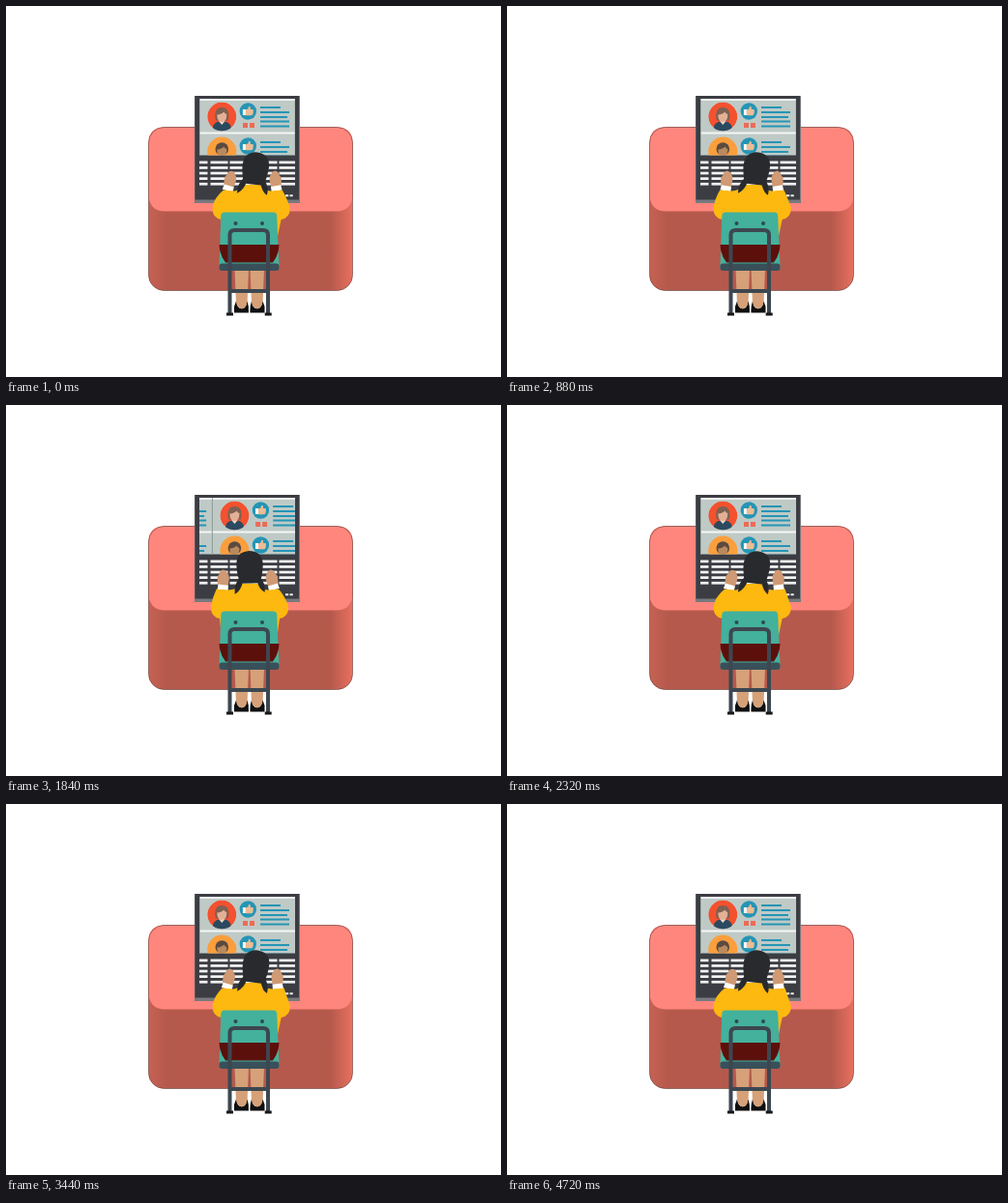
Write an HTML page that moves like this. It is 512 px wide and 384 px high and loops after 4800 ms.

```html
<!DOCTYPE html>
<html lang="en">
<head>
<meta charset="utf-8">
<title>Student at a laptop</title>
<style>
html, body { margin: 0; width: 100%; height: 100%; overflow: hidden; background: #fff; }
svg { display: block; width: 100vw; height: 100vh; }
</style>
</head>
<body>
<svg viewBox="0 0 512 384" xmlns="http://www.w3.org/2000/svg">
  <defs>
    <linearGradient id="front">
      <stop offset="0" stop-color="#c66254"/>
      <stop offset=".09" stop-color="#b5594c"/>
      <stop offset=".89" stop-color="#b5594c"/>
      <stop offset="1" stop-color="#e8705f"/>
    </linearGradient>
    <clipPath id="screen"><rect x="200" y="96" width="99" height="58.5"/></clipPath>
    <clipPath id="disc"><circle r="15"/></clipPath>

    <g id="thumb">
      <circle r="8.7" fill="#2595b5"/>
      <rect x="-5.4" y="-2" width="3" height="6" fill="#fff"/>
      <path d="M-2.4 -1.6L.2 -2.8L.8 -5.2Q3 -5.4 2.5 -2H5Q6 -1.2 5 3Q4.6 4.2 3 4.2H-2.4Z" fill="#ecbc94"/>
    </g>
    <g id="lines" fill="#2595b5">
      <rect x="63" y="7" width="21" height="2"/>
      <rect x="63" y="12" width="30" height="2"/>
      <rect x="63" y="17" width="28" height="2"/>
      <rect x="63" y="21.500" width="30" height="2"/>
      <rect x="63" y="26.500" width="30" height="2"/>
    </g>
    <g id="page">
      <rect y="96" width="99.500" height="59" fill="#bfcac6"/>
      <path d="M0 97H99.500M0 131.500H99.500" stroke="#f4f6f5" stroke-width="2"/>
      <g transform="translate(23.3 114.5)" clip-path="url(#disc)">
        <circle r="15" fill="#f4512f"/>
        <path d="M-6.500 4Q-9 -9.500 0 -9.500T6.500 4Z" fill="#7d6152"/>
        <path d="M-9.500 15Q-10 6 -3 5H3Q10 6 9.500 15Z" fill="#2b4a60"/>
        <path d="M-3 5L0 8.500L3 5L2 2H-2Z" fill="#f0d8c8"/>
        <path d="M-5 -2Q0 -2.500 2 -5Q3 -3 5 -2.500Q5 5.500 0 5.500T-5 -2Z" fill="#e3b096"/>
      </g>
      <use href="#thumb" x="50.300" y="109"/>
      <path d="M45 121h5v5h-5zM52 121h5v5h-5z" fill="#ee6a55"/>
      <use href="#lines" y="97"/>
      <g transform="translate(23.3 150.5)">
        <circle r="15" fill="#fb9e3c"/>
        <circle cy="-2.500" r="6.800" fill="#5b4a40"/>
        <path d="M-5 -2Q0 -2.500 2 -5Q3 -3 5 -2.500Q5 5.500 0 5.500T-5 -2Z" fill="#b98a5e"/>
      </g>
      <use href="#thumb" x="50.300" y="145"/>
      <use href="#lines" y="133"/>
      <path d="M.2 96V155" stroke="#8d9b99" stroke-width="1"/>
    </g>
    <g id="hand">
      <path d="M-5.800 6L-6.200 -1Q-5.500 -3 -4.300 -4Q-4.200 -7.500 -2 -8Q-.3 -9.700 1.300 -8.400Q3.600 -8.500 4 -6Q6.200 -4 6.200 0L5 7.500H-4.500Z" fill="#cf9a74"/>
      <path d="M-5.200 6L5.200 7.200L4.800 12.500L-6.200 11.500Z" fill="#fff"/>
    </g>
  </defs>

  <!-- desk -->
  <rect x="147.500" y="125.500" width="211" height="169" rx="16" fill="url(#front)"/>
  <path d="M147.500 198V141.500Q147.500 125.500 163.500 125.500H342.500Q358.500 125.500 358.500 141.500V198Q356 212.500 342 212.500H164Q150 212.500 147.500 198Z" fill="#ff867d"/>
  <rect x="147.500" y="125.500" width="211" height="169" rx="16" fill="none" stroke="#5a3531" stroke-opacity=".55"/>

  <!-- laptop -->
  <rect x="195" y="93" width="109" height="111" fill="#77797e"/>
  <rect x="195.500" y="93" width="107.500" height="107.500" fill="#3b3d43"/>
  <g clip-path="url(#screen)"><g id="feed">
    <use href="#page" x="200"/><use href="#page" x="299"/>
  </g></g>
  <g id="keys" fill="#f4f4f4"></g>
  <path d="M289 195.300h3.200v2h-3.200zM293.500 195.300h3.200v2h-3.200z" fill="#f4f4f4"/>

  <!-- student -->
  <g id="left"><use href="#hand"/></g>
  <g id="right"><use href="#hand" transform="scale(-1 1)"/></g>
  <path id="torso" fill="#fdb90f"/>
  <g id="head" fill="#282a2d">
    <path d="M253 151Q266.500 151.500 266.700 165Q266.500 176 263 184.500H243Q239.500 176 239.300 165Q239.500 151.500 253 151Z"/>
    <path d="M242 179Q236 186 237 195.500Q243.500 192 245.500 183Z"/>
    <path d="M264 179Q269.500 186 268 194Q262.500 191.500 260.500 183Z"/>
  </g>
  <path d="M236.500 272H251L249.500 309H238ZM252.500 272H267L265.500 309H254Z" fill="#d6a178"/>
  <path id="shoe" d="M238 305.500Q239 313 243.700 313.300T249.500 305.500Q251.500 311 251 317.500H236V311Z" fill="#101011"/>
  <use href="#shoe" transform="translate(503.500 0) scale(-1 1)"/>
  <path d="M238 305Q239 313 243.700 313.300T249.500 305ZM254 305Q255 313 259.800 313.300T265.500 305Z" fill="#d6a178"/>

  <!-- chair -->
  <path d="M226 213.500H276.500Q280 213.500 280.200 217L282.500 270Q282.500 274 279 274H224Q220.500 274 220.500 270L222.300 217Q222.500 213.500 226 213.500Z" fill="#43b19c"/>
  <path d="M220.500 247H282.500Q282 258 276 265.500H227Q221 258 220.500 247Z" fill="#5c100c"/>
  <rect x="220.500" y="266.500" width="62" height="7.500" rx="3" fill="#39505a"/>
  <path d="M231.500 319V237Q231.500 232 236.500 232H266Q271 232 271 237V319M231.500 295H271" fill="none" stroke="#3d4750" stroke-width="4"/>
  <path d="M228 317.500h7v3h-7zM267.700 317.500h7v3h-7z" fill="#15181b"/>
  <circle cx="237.500" cy="225" r="2" fill="#2d4a50"/>
  <circle cx="265" cy="225" r="2" fill="#2d4a50"/>
</svg>
<script>
const LOOP = 4800, STEP = 80, SWAY = 1200;
const $ = id => document.getElementById(id);

// keyboard: five rows, each with the same [x, width] runs
const runs = [[200, 8.5], [211.5, 18], [231.5, 49], [282.5, 16.5]];
let keys = "";
for (let row = 0; row < 5; row++)
  for (const [x, w] of runs)
    keys += `<rect x="${x}" y="${160.5 + row * 5.6}" width="${w}" height="2.7"/>`;
$("keys").innerHTML = keys;

// smooth periodic curve through [phase, value] pairs
function cycle(points, p) {
  const n = points.length;
  const at = i => {
    const k = (i % n + n) % n;
    return [points[k][0] + Math.floor(i / n), points[k][1]];
  };
  let i = n - 1;
  while (i > 0 && points[i][0] > p) i--;
  const [t0, a] = at(i), [t1, b] = at(i + 1);
  const slope = j => (at(j + 1)[1] - at(j - 1)[1]) / (at(j + 1)[0] - at(j - 1)[0]);
  const d = t1 - t0, u = (p - t0) / d, v = 1 - u;
  return a * v * v * (1 + 2 * u) + b * u * u * (3 - 2 * u)
    + d * u * v * (slope(i) * v - slope(i + 1) * u);
}

const headPath = [[0, 258.3], [.267, 252], [.4, 248], [.533, 252], [.733, 258.3], [.933, 258.4]];
const leftPath = [[0, 232], [.267, 224.7], [.4, 225.7], [.533, 224.7], [.733, 227.3], [.933, 232.2]];
const rightPath = [[0, 278.7], [.267, 274.6], [.4, 274.6], [.533, 274.9], [.733, 279.5], [.933, 280.6]];

function place(id, x, y, turn) {
  $(id).setAttribute("transform", `translate(${x} ${y}) rotate(${turn})`);
}

function draw(t) {
  const p = t % SWAY / SWAY;
  const head = cycle(headPath, p), lx = cycle(leftPath, p), rx = cycle(rightPath, p);
  const lean = head - 253, c = 252.3 + lean * .25;

  $("head").setAttribute("transform", `rotate(${lean * 1.25} 253 211)`);
  place("left", lx, 179.5, (lx - 225) * 1.5);
  place("right", rx, 179.5, (rx - 281) * 1.5);
  $("torso").setAttribute("d",
    `M${lx - 7} 190.5L${lx + 4} 191.5Q${c - 14} 192 ${c - 9} 185H${c + 9}` +
    `Q${c + 14} 192 ${rx - 4} 191.5L${rx + 7} 190.5Q${c + 36} 197 ${c + 40} 208` +
    `Q${c + 41} 219 ${c + 31} 221L280 243H223L${c - 31} 221Q${c - 41} 219 ${c - 40} 208` +
    `Q${c - 38} 198 ${lx - 7} 190.5Z`);

  const s = Math.max(0, Math.min(1, (t - 1300) / 700));
  $("feed").setAttribute("transform", `translate(${-99 * s * s * (3 - 2 * s)} 0)`);
}

const start = performance.now();
function tick() {
  const t = Math.max(0, performance.now() - start) % LOOP;
  draw(Math.floor(t / STEP) * STEP);
  requestAnimationFrame(tick);
}
draw(0);
requestAnimationFrame(tick);
</script>
</body>
</html>
```
